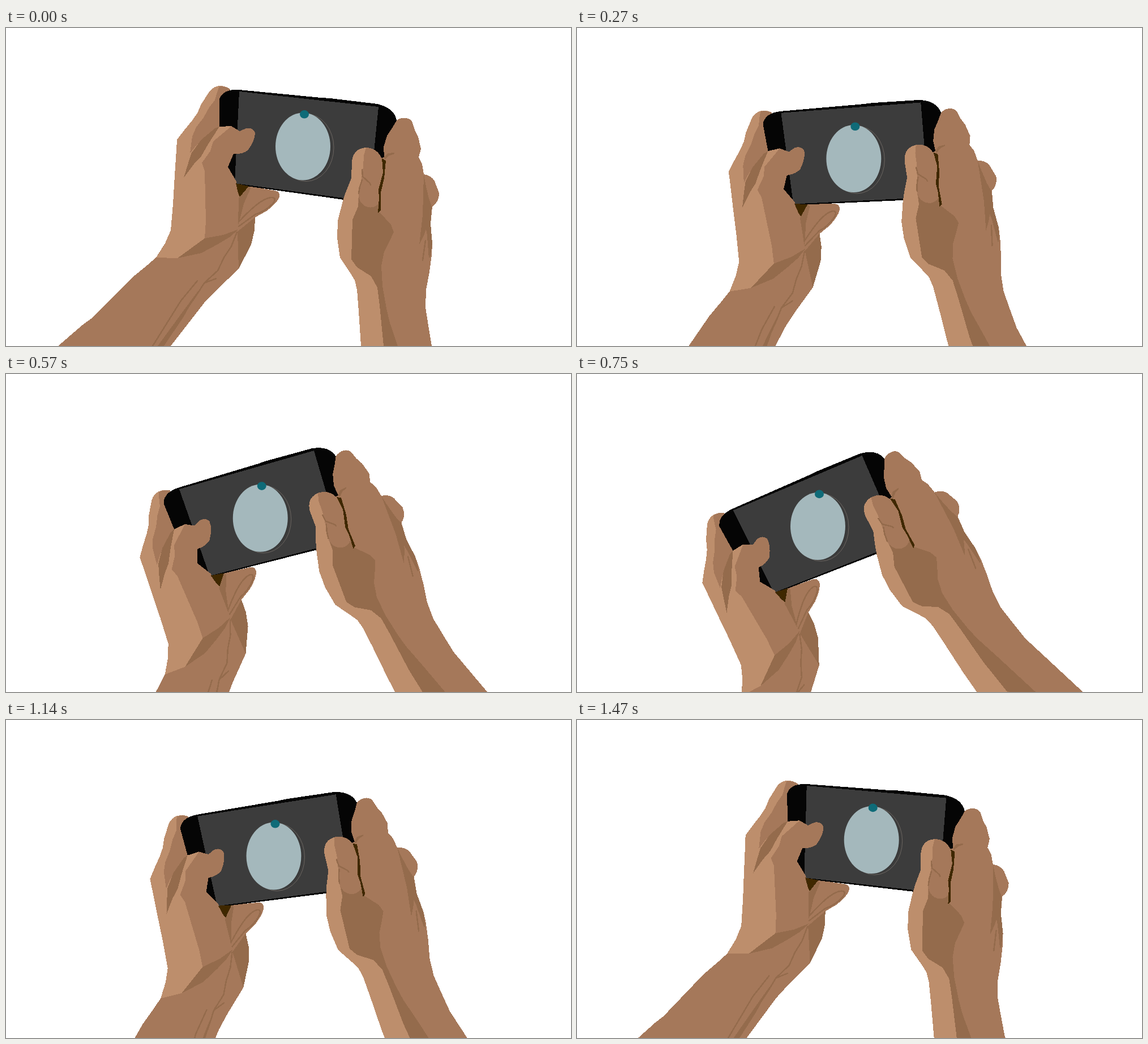
An HTML page that plays this animation: 998x561 px, repeating every 1.5 s.

```html
<!DOCTYPE html>
<html lang="en">
<head>
<meta charset="utf-8">
<title>Tilting phone</title>
<style>
  html, body { margin: 0; height: 100%; overflow: hidden; background: #fff; }
  svg { display: block; width: 100vw; height: 100vh; }
  #hands { shape-rendering: crispEdges; }
  .light { fill: #bd8e6c; }
  .mid { fill: #a5785a; }
  .dark { fill: #946b4c; }
  .brown { fill: #3f2800; }
  .crease { fill: none; stroke: #946b4c; stroke-width: 2.5; stroke-linecap: round; stroke-linejoin: round; }
</style>
</head>
<body>
<svg viewBox="0 0 998 561">
  <g id="hands">
    <!-- left fingers behind the phone -->
    <path class="light" d="M396 108Q388 102 377 102Q367 103 360 111L345 134L338 150L329 163L315 180L302 197L301 215L400 215Z"/>
    <path class="mid" d="M396 108Q387 102 377 103L374 110L369 127L359 140L349 158L336 175L329 191L326 217L400 215Z"/>
    <path class="mid" d="M404 277L430 279L476 287Q484 289 483 297Q481 307 460 323L440 334L411 360Z"/>
    <!-- phone -->
    <path fill="#050505" d="M377 125Q384 107 412 109L556 123L573 124L656 134Q686 141 690 163L672 312L597 303L404 276L388 274L377 174Z"/>
    <path fill="#3c3c3c" d="M412 112L658 139L641 306L404 274Z"/>
    <!-- left hand and forearm -->
    <path class="mid" d="M377 174L398 173L413 182L424 177Q436 175 440 185Q440 199 427 216Q417 223 402 222L392 245L407 271L411 300L413 340L440 334L439 357L433 382L411 425L372 462L350 485L291 561L92 561L135 524L150 513L180 483L222 441L250 418L265 405L300 350L303 220Z"/>
    <path class="light" d="M302 197L301 215L298 260L295 310L291 357L280 382L265 405L303 406L351 371L353 340L351 252L346 238L361 217L366 200L390 180L398 173L377 174L366 182L326 215L330 175Z"/>
    <path class="mid" d="M336 175L329 191L325 221L345 196L364 179L377 174L377 125Z"/>
    <path class="dark" d="M369 177L377 174L366 191L357 205L345 226L332 240L314 264L322 238L328 220L345 197Z"/>
    <path class="dark" d="M303 406L351 371L384 365L411 355L395 369L375 381L345 397Z"/>
    <path class="dark" d="M409 359L440 334L439 357L433 382L411 425Z"/>
    <path class="dark" d="M429 280L432 283L420 310L413 338L410 348L411 300Z"/>
    <path class="brown" d="M406 274L429 279L413 298L410 291Z"/>
    <path class="crease" d="M411 342C430 322 453 299 470 299Q479 300 471 310Q457 324 440 329L411 350"/>
    <path class="crease" d="M408 360L398 385L385 405L374 428L350 450M371 442L350 450L338 469L311 508L271 566M338 446L309 481L259 561"/>
    <path class="dark" d="M340 463L311 502L268 561L279 561L314 509Z"/>
    <!-- right hand and forearm -->
    <path class="mid" d="M667 210L673 190L683 175L690 163Q698 157 708 159Q717 161 719 170L722 180L728 192L733 213L729 228L735 240L738 258Q751 260 757 270L765 291Q765 307 753 315L750 345L753 380L752 400L748 430L742 462L741 493L746 525L752 561L795 694L810 740L633 620L627 561L623 500L620 462L616 445L608 432L590 405L585 370L586 340L595 305L600 290L610 265L611 235Q614 212 638 211Q656 213 663 229L668 228Z"/>
    <path class="light" d="M636 211Q614 212 611 235L610 265L600 290L595 305L586 340L585 370L590 405L608 432L616 445L620 462L623 500L627 561L633 620L690 690L678 626L667 561L660 490L656 458L645 438L620 422L610 408L612 338L622 315L623 285L627 270L631 245L632 225Z"/>
    <path class="dark" d="M624 292L622 315L612 338L610 408L620 422L645 438L656 458L660 490L667 561L678 626L740 690L721 650L692 561L678 520L672 495L665 455L663 420L668 395L678 375L685 360L680 347L660 325L657 310Z"/>
    <path class="mid" d="M630 252L632 269L624 285Q621 303 630 311Q642 321 655 313L662 303L660 265Z"/>
    <path class="crease" d="M629 250L630 262L643 274L644 277M629 268L625 280L623 292"/>
    <path class="brown" d="M664 230L671 234L668 265L662 290L662 322L657 326L659 300L658 285L666 255Z"/>
    <path class="dark" d="M668 228L674 221L686 220L686 222L677 225L669 232Z"/>
    <path class="dark" d="M738 258L741 275L747 301L752 315L750 345L753 380L749 405L746 376L742 355L738 366L730 382L736 330Z"/>
    <path class="crease" d="M741 375L736 410M745 365L748 404"/>
  </g>
  <g id="ball">
    <ellipse cx="530" cy="211" rx="49" ry="59.5" fill="none" stroke="#8a8078" stroke-width=".6"/>
    <ellipse cx="526.5" cy="210" rx="48.5" ry="59" fill="#383838"/>
    <ellipse cx="524.5" cy="209" rx="48.5" ry="59.5" fill="#a4b8bc"/>
    <ellipse cx="527" cy="152.3" rx="8" ry="7.3" fill="#0f6b78"/>
  </g>
</svg>
<script>
  const hands = document.getElementById('hands');
  const ball = document.getElementById('ball');
  const STEP = 30, STEPS = 50, TURN = 26;

  function draw(now) {
    const n = Math.floor(now / STEP) % STEPS;
    const k = n <= TURN ? n / TURN : (STEPS - n) / (STEPS - TURN);
    // the hands turn about a drifting centre, the ball stays upright
    hands.setAttribute('transform',
      `translate(${428 + 6 * k} ${407 + 86.5 * k}) rotate(${-30.4 * k}) translate(-428 -407)`);
    ball.setAttribute('transform', `translate(${-103 * k} ${62 * k})`);
  }

  const start = performance.now();
  function loop() {
    draw(performance.now() - start);
    requestAnimationFrame(loop);
  }
  loop();
</script>
</body>
</html>
```
